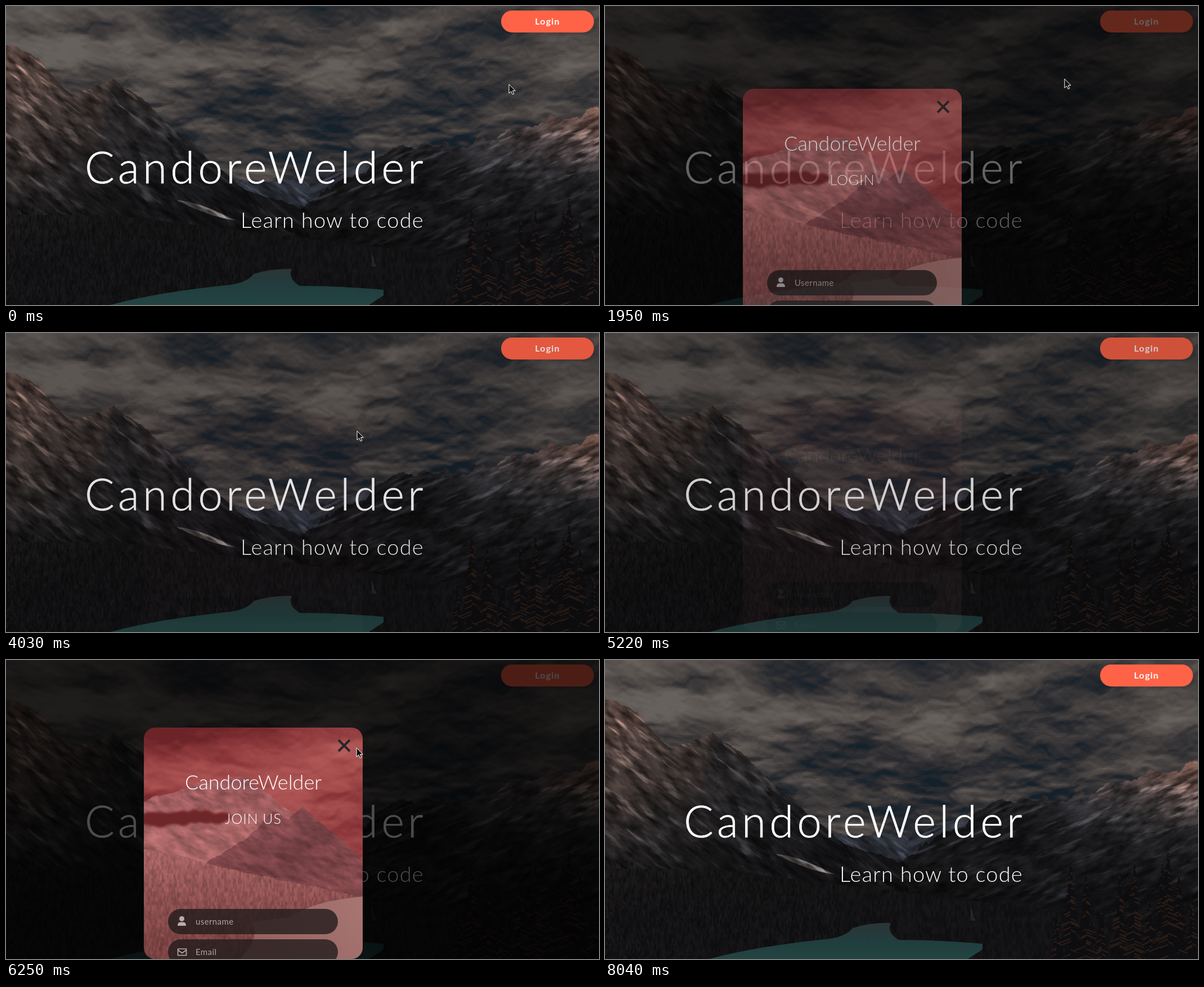
These frames come from a looping animation (1054x531 px, 8180 ms). An HTML page with a canvas:

```html
<!DOCTYPE html>
<html lang="en">
<head>
<meta charset="utf-8">
<title>CandoreWelder</title>
<style>
  html, body { margin: 0; width: 100%; height: 100%; overflow: hidden; background: #111; }
  body { position: relative; font-family: Lato, "Open Sans", sans-serif; font-weight: 300; color: #fff; }
  canvas, .text, .login, .overlay, .card, .field, svg { position: absolute; left: 0; top: 0; }
  .text { line-height: 0; white-space: nowrap; }
  .title { left: auto; right: 306px; top: 285px; font-size: 78px; letter-spacing: 6.3px; -webkit-text-stroke: .7px; }
  .sub { left: 417px; top: 379px; font-size: 38px; letter-spacing: 1.25px; }
  .login { left: 880px; top: 8px; width: 165px; height: 39px; line-height: 37px; border-radius: 20px;
    background: #ff6347; text-align: center; font-weight: 700; font-size: 16px; letter-spacing: 1.2px; }
  .overlay { width: 100%; height: 100%; background: rgba(0, 0, 0, .7); }
  .card { left: 245px; width: 389px; height: 411px; border-radius: 20px; overflow: hidden; }
  .card .text { left: 0; width: 100%; text-align: center; }
  .card h2 { margin: 0; top: 96px; font-size: 36px; font-weight: 300; }
  .card p { margin: 0; top: 160.5px; font-size: 25px; letter-spacing: 1px; }
  .field { left: 43px; width: 302px; height: 45px; line-height: 44px; border-radius: 23px;
    background: rgba(32, 28, 28, .78); color: #aaa2a0; text-indent: 49px;
    font-size: 15px; font-weight: 400; letter-spacing: .4px; }
  .field svg { left: 16px; top: 12px; }
  .cross { left: 344px; top: 20px; }
</style>
</head>
<body>
<canvas id="scene" width="1054" height="531"></canvas>
<div class="text title">CandoreWelder</div>
<div class="text sub">Learn how to code</div>
<div class="login" id="login">Login</div>
<div class="overlay" id="overlay"></div>
<svg id="cursor" width="24" height="24" viewBox="-3 -3 24 24">
  <path id="arrow" d="M0 0V16L3.8 12.6 6.2 18 8.8 17 6.5 11.5H11.2Z" fill="#111" stroke="#fff"/>
  <path id="hand" d="M.8 1.2Q2.4-.8 3.6 1.2L4.8 5.4Q8 4 11 7 12 11 10.2 15.4H3.8Q2 12-2 8.6-1 6.6 2.2 9.6Z" fill="#fff" stroke="#111"/>
</svg>
<script>
const W = 1054, H = 531, LOOP = 8180;
const $ = id => document.getElementById(id);
const clamp = v => Math.max(0, Math.min(1, v));
const mix = (a, b, f) => a + (b - a) * f;

// Seeded value noise
let seed = 20;
const rand = () => (seed = (seed * 1664525 + 1013904223) >>> 0) / 4294967296;
const lattice = Float32Array.from({ length: 65536 }, rand);
const cell = (x, y) => lattice[(x & 255) | (y & 255) << 8];
function noise(x, y) {
  const i = Math.floor(x), j = Math.floor(y);
  let u = x - i, v = y - j;
  u *= u * (3 - 2 * u);
  v *= v * (3 - 2 * v);
  return mix(mix(cell(i, j), cell(i + 1, j), u), mix(cell(i, j + 1), cell(i + 1, j + 1), u), v);
}
function fbm(x, y, octaves) {
  let sum = 0, amp = .5, total = 0;
  for (let i = 0; i < octaves; i++) {
    sum += amp * noise(x, y);
    total += amp;
    amp *= .52;
    x = x * 2 + 17;
    y = y * 2 + 31;
  }
  return sum / total;
}

function layer(w, h) {
  const c = document.createElement('canvas');
  c.width = w;
  c.height = h;
  return c.getContext('2d');
}
function gradient(g, x0, y0, x1, y1, ...colors) {
  const fill = g.createLinearGradient(x0, y0, x1, y1);
  colors.forEach((c, i) => fill.addColorStop(i / (colors.length - 1), c));
  return fill;
}
function shape(g, path, fill) {
  g.fillStyle = fill;
  g.fill(new Path2D(path));
}
// Land below a skyline through key points, broken up by noise
function ridge(g, keys, rough, fill) {
  const last = keys.length - 1;
  g.beginPath();
  g.moveTo(keys[0][0], H);
  for (let x = keys[0][0], i = 0; x <= keys[last][0]; x++) {
    if (i < last - 1 && x > keys[i + 1][0]) i++;
    const [x0, y0] = keys[i], [x1, y1] = keys[i + 1];
    g.lineTo(x, mix(y0, y1, (x - x0) / (x1 - x0)) + (fbm(x / 20, y0, 4) - .5) * rough);
  }
  g.lineTo(keys[last][0], H);
  g.fillStyle = fill;
  g.fill();
}

// Clouds lit from above; soft areas [x, y, rx, ry, amount] steer the light
function clouds(g, w, h, areas, ramp, contrast) {
  const density = new Float32Array(w * h), img = g.createImageData(w, h), d = img.data;
  for (let y = 0, i = 0; y < h; y++) {
    const v = y / 60 + (y / 150) ** 2, scale = 1 / (92 - y * .1);
    for (let x = 0; x < w; x++, i++) {
      const u = (x - w / 2) * scale + 60, bend = fbm(u * 1.7 + 40, v * 1.7, 3);
      let sum = .45 + (fbm(u + bend * .5, v + bend * .5, 6) - .5) * contrast;
      for (const [cx, cy, rx, ry, amount] of areas) {
        const q = ((x - cx) / rx) ** 2 + ((y - cy) / ry) ** 2;
        if (q < 5) sum += amount * Math.exp(-q);
      }
      density[i] = sum;
      const above = density[i - Math.min(y, 7) * w];
      const pos = clamp(sum + (sum - above) * .8) * (ramp.length - 1.001), k = Math.floor(pos);
      for (let c = 0; c < 3; c++) d[i * 4 + c] = mix(ramp[k][c], ramp[k + 1][c], pos - k);
      d[i * 4 + 3] = 255;
    }
  }
  g.putImageData(img, 0, 0);
}
// Multiply painted pixels by a grain
function roughen(g, w, h, grain) {
  const img = g.getImageData(0, 0, w, h), d = img.data;
  for (let p = 0; p < d.length; p += 4) {
    if (!d[p + 3]) continue;
    const i = p / 4, m = grain(i % w, Math.floor(i / w));
    for (let k = 0; k < 3; k++) d[p + k] *= m;
  }
  g.putImageData(img, 0, 0);
}
function stroke(g, x0, y0, x1, y1, color, width) {
  g.strokeStyle = color;
  g.lineWidth = width;
  g.beginPath();
  g.moveTo(x0, y0);
  g.lineTo(x1, y1);
  g.stroke();
}
function tree(g, x, top) {
  for (let y = top; y < H + 6; y += 2.5) {
    for (const side of [-1, 1]) {
      const w = 1 + (y - top) * .13 * (.3 + rand());
      stroke(g, x, y - 2, x + side * w, y + w * .3, rand() < .22 ? '#2c1d17' : '#0e0e10', 2.2);
    }
  }
}

function paintScene(g) {
  clouds(g, W, 385, [
    [100, 60, 220, 115, .36], [350, 112, 95, 42, .28], [615, 105, 130, 42, .26], [780, 22, 90, 36, .24],
    [345, 45, 75, 36, -.28], [850, 65, 105, 55, -.3], [970, 110, 110, 45, .22], [650, 225, 420, 60, -.1]
  ], [[20, 32, 42], [43, 44, 48], [66, 62, 61], [88, 82, 79], [103, 97, 93]], 1.15);

  const land = layer(W, H);
  ridge(land, [[380, 310], [530, 312], [700, 262], [760, 300]], 14, gradient(land, 0, 270, 0, 365, '#363942', '#20232a'));
  ridge(land, [[520, 364], [690, 252], [830, 242], [905, 224], [1030, 186], [1054, 180]], 30,
    gradient(land, 1040, 185, 975, 375, '#72544b', '#453c3b', '#2b2a2d', '#151517'));
  ridge(land, [[540, 380], [760, 352], [900, 318], [1054, 292]], 14, gradient(land, 0, 300, 0, 410, '#232224', '#111113'));
  ridge(land, [[300, 262], [326, 232], [360, 275]], 6, '#262528');
  ridge(land, [[0, 66], [55, 92], [112, 153], [150, 147], [190, 130], [250, 171], [345, 264], [430, 328], [540, 366], [700, 400]],
    12, gradient(land, 30, 80, 190, 400, '#503f3a', '#3b322f', '#222021', '#121213'));
  shape(land, 'M190 134L350 268 424 326 540 367 400 400 250 375 165 250Z',
    gradient(land, 190, 130, 340, 370, '#302c2c', '#201f21', '#121214'));
  shape(land, 'M304 345Q340 346 408 381 360 374 304 345Z', '#4a4644');
  ridge(land, [[0, 335], [230, 362], [400, 395], [690, 425], [1054, 430]], 8,
    gradient(land, 0, 335, 0, 470, 'rgba(20,19,20,.3)', '#121214'));
  roughen(land, W, H, (x, y) => {
    if (y > Math.max(370, 348 + x * .12)) return .55 + .9 * fbm(x / 3.5, y / 10, 3);
    const a = x < 540 ? .65 : -.4, c = Math.cos(a), s = Math.sin(a);
    const u = x * c + y * s, v = y * c - x * s;
    const snow = Math.max(0, fbm(u / 45, v / 9 + 50, 4) - .6);
    return .2 + 1.5 * fbm(u / 22, v / 8, 5) + snow * 5;
  });
  for (let i = 0; i < 1500; i++) {
    const x = rand() ** 1.5 * 420, y = 350 + x * .12 + rand() * 185;
    stroke(land, x, y, x, y + 3 + rand() * 6, rand() < .4 ? 'rgba(52,37,30,.4)' : 'rgba(8,8,10,.5)', 1.4);
  }
  g.drawImage(land.canvas, 0, 0);

  shape(g, 'M185 531Q270 508 400 495 430 490 440 476 470 466 508 467 500 484 522 497 590 497 671 504L671 514 645 531Z',
    gradient(g, 0, 466, 0, 531, '#2b3436', '#213d3d', '#234443'));
  for (let y = 438; y < 464; y += 2) stroke(g, 650, y, 648 + noise(y / 7, 3) * 14, y, 'rgba(110,112,112,.4)', 1);
  for (let i = 0; i < 10; i++) tree(g, 800 + i * 27 + rand() * 8, (i % 3 ? 360 : 425) + rand() * 30);
  tree(g, 1001, 345);
}

function paintCard(g, w, h) {
  clouds(g, w, h, [[70, 12, 140, 40, -.45], [170, 95, 180, 40, .2], [330, 60, 110, 70, .15]],
    [[108, 36, 40], [140, 56, 59], [168, 80, 80], [184, 97, 95]], .8);
  const land = layer(w, h);
  ridge(land, [[0, 128], [108, 98], [183, 88], [260, 150], [389, 250]], 14,
    gradient(land, 0, 90, 0, 240, '#98575a', '#ab6867'));
  ridge(land, [[80, 262], [200, 182], [231, 150], [258, 164], [281, 138], [389, 235]], 10,
    gradient(land, 230, 140, 300, 310, '#8a4e52', '#764145', '#84494c'));
  ridge(land, [[0, 212], [130, 246], [389, 302]], 6,
    gradient(land, 0, 215, 0, 411, '#a36261', '#8a4e4e', '#763f40'));
  roughen(land, w, h, (x, y) => y > 215 + x * .22
    ? .76 + .48 * fbm(x / 3, y / 8, 3)
    : .72 + .56 * fbm((x + y * .7) / 22, (y - x * .5) / 9, 4));
  g.drawImage(land.canvas, 0, 0);
  g.filter = 'blur(2px)';
  g.fillStyle = '#6e2729';
  for (let x = 0; x < 150; x += 10) {
    g.beginPath();
    g.ellipse(x, 157 + rand() * 8, 14, 6 + rand() * 9, 0, 0, 7);
    g.fill();
  }
  g.filter = 'none';
  shape(g, 'M389 300Q300 308 262 336L190 345Q210 372 170 411H389Z', gradient(g, 389, 300, 220, 411, '#a87672', '#956260'));
}

const icons = {
  user: '<circle cx="8.500" cy="5.500" r="4.500"/><path d="M1 18Q1 11.500 6 11.500H11Q16 11.500 16 18Z"/>',
  mail: '<path d="M1.500 5H16.500V16.500H1.500ZM1.500 7 9 12.500 16.500 7" fill="none" stroke="#b5aeac" stroke-width="1.600"/>'
};
const photo = layer(389, 411);
function addCard(top, heading, fields) {
  const card = document.createElement('div');
  card.className = 'card';
  card.style.top = top + 'px';
  card.innerHTML = `<h2 class="text">CandoreWelder</h2><p class="text">${heading}</p>
    <svg class="cross" width="24" height="24"><path d="M2 2 22 22M22 2 2 22" stroke="#2b2526" stroke-width="4"/></svg>` +
    fields.map(([label, icon], i) => `<div class="field" style="top:${322 + i * 54}px">
      <svg width="18" height="19" fill="#b5aeac">${icons[icon] || ''}</svg>${label}</div>`).join('');
  const bg = layer(389, 411);
  bg.drawImage(photo.canvas, 0, 0);
  card.prepend(bg.canvas);
  $('overlay').append(card);
  return card;
}

paintScene($('scene').getContext('2d'));
paintCard(photo, 389, 411);
const signIn = addCard(147, 'LOGIN', [['Username', 'user'], ['Password']]);
const join = addCard(120, 'JOIN US', [['username', 'user'], ['Email', 'mail']]);

// The standard CSS "ease" curve
function ease(x) {
  let lo = 0, hi = 1;
  for (let i = 0; i < 20; i++) {
    const s = (lo + hi) / 2;
    if (.75 * s * (1 - s) + s ** 3 < x) lo = s; else hi = s;
  }
  return .3 * lo * (1 - lo) ** 2 + 3 * (1 - lo) * lo * lo + lo ** 3;
}
// [first visible, start of the one-second fade, opens]
const fades = [[1340, 1365, true], [3700, 3480, false], [5200, 5030, true], [6980, 7005, false]];
function openness(t) {
  const fade = fades.filter(f => t >= f[0]).pop();
  if (!fade) return 0;
  const e = ease(clamp((t - fade[1]) / 1000));
  return fade[2] ? e : 1 - e;
}

// [start, end, x, y]
const moves = [
  [400, 1043, 975, 22], [1700, 2384, 404, 410], [2500, 3278, 595, 184], [3700, 4023, 624, 174],
  [4023, 4310, 640, 545], [6110, 6258, 623, 156], [6258, 6705, 600, 154], [7160, 7600, 570, 545]
];
function pointer(t) {
  let x = 894, y = 139;
  for (const [from, to, mx, my] of moves) {
    const f = clamp((t - from) / (to - from)), s = f * f * (3 - 2 * f);
    x = mix(x, mx, s);
    y = mix(y, my, s);
  }
  return [x, y];
}

const within = (t, a, b) => t >= a && t < b;
function render(ms) {
  // The picture advances in steps of about 149 ms
  const t = Math.min(54, Math.floor(ms / 148.6)) * 149;
  const open = openness(t), [x, y] = pointer(t);
  const onButton = within(t, 850, 1780);
  const onCross = within(t, 3100, 3720) || within(t, 6500, 7200);
  const card = t < 4800 ? signIn : join;
  signIn.hidden = card !== signIn;
  join.hidden = card !== join;
  card.style.opacity = $('overlay').style.opacity = open;
  $('login').style.top = (onButton ? 6 : 8) + 'px';
  $('hand').style.display = onButton || onCross ? '' : 'none';
  $('arrow').style.display = onButton || onCross ? 'none' : '';
  $('cursor').style.transform = `translate(${x - 3}px, ${y - 3}px)`;
}

const start = performance.now();
function tick() {
  render((performance.now() - start) % LOOP);
  requestAnimationFrame(tick);
}
tick();
</script>
</body>
</html>
```
